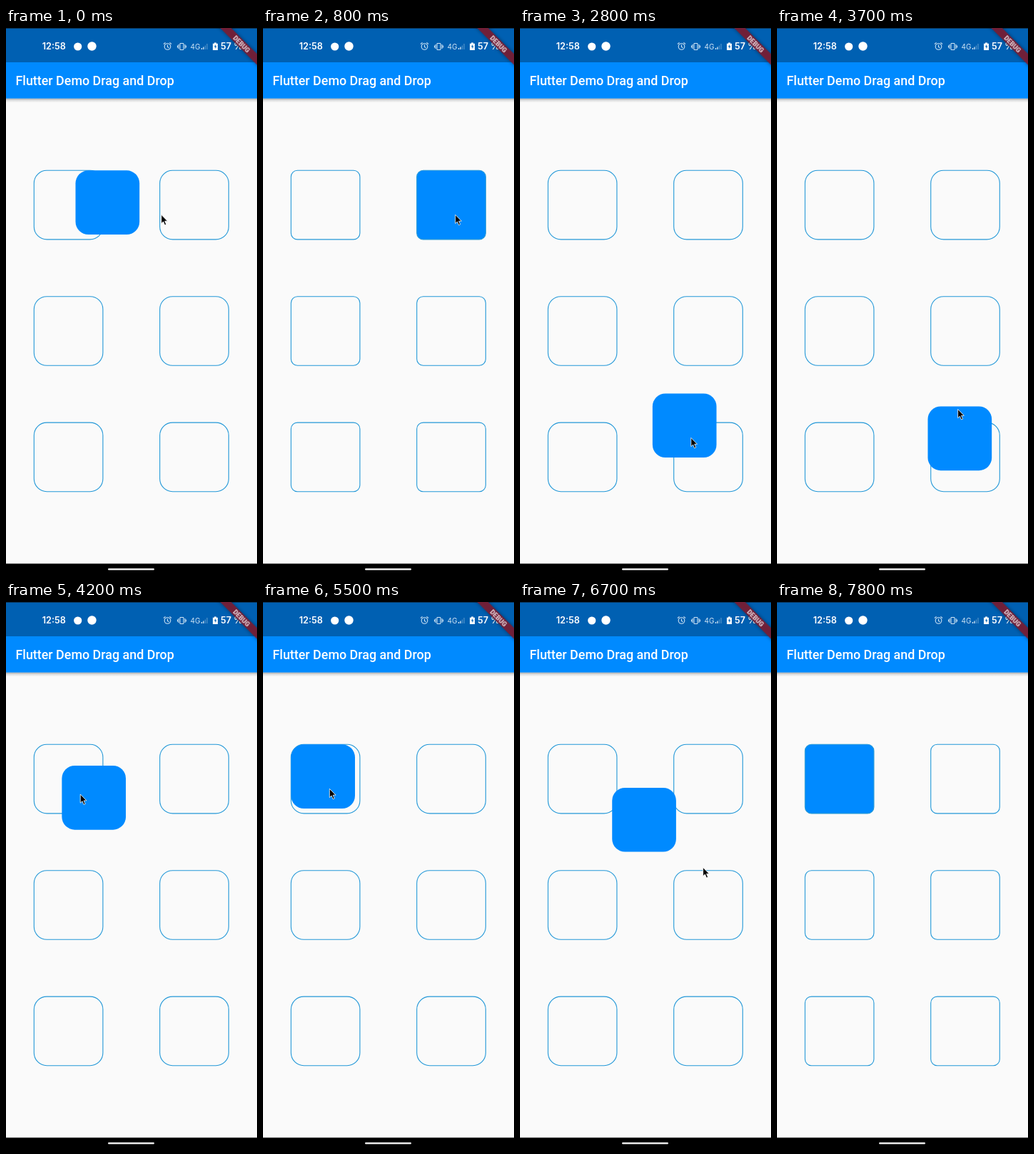
These frames come from a looping animation (352x764 px, 8.4 s). An HTML page:

```html
<!DOCTYPE html>
<html lang="en">
<head>
<meta charset="utf-8">
<title>Drag and Drop</title>
<style>
  html, body { margin: 0; width: 100%; height: 100%; overflow: hidden; background: #fafafa; }
  svg { display: block; width: 352px; height: 764px; }
  text { fill: #fff; font-family: Inter, Roboto, sans-serif; }
  .title { font: 500 17.9px Roboto, sans-serif; }
  .clock { font-size: 12.6px; font-weight: 600; }
  .line { fill: none; stroke: #cfe4f5; stroke-width: 1.1; }
  .banner { filter: drop-shadow(0 0 2.5px rgba(0, 0, 0, .5)); }
  .banner text { font: 900 9.1px Roboto, sans-serif; fill: #dcc6cd; }
</style>
</head>
<body>
<svg viewBox="0 0 352 764">
  <defs>
    <linearGradient id="shade" x2="0" y2="1">
      <stop offset="0" stop-color="#000" stop-opacity=".35"/>
      <stop offset=".4" stop-color="#000" stop-opacity=".12"/>
      <stop offset="1" stop-color="#000" stop-opacity="0"/>
    </linearGradient>
  </defs>
  <rect width="352" height="764" fill="#fafafa"/>
  <rect y="98.500" width="352" height="6" fill="url(#shade)"/>
  <rect y="48" width="352" height="50.600" fill="#008aff"/>
  <rect width="352" height="48" fill="#0060b2"/>
  <rect width="352" height="1" fill="#0a3358"/>
  <text class="title" x="13.5" y="80">Flutter Demo Drag and Drop</text>

  <text class="clock" x="50.8" y="30">12:58</text>
  <g fill="#fff">
    <circle cx="100.7" cy="26" r="5.6"/>
    <circle cx="120.5" cy="25.5" r="6.2"/>
  </g>
  <g class="line">
    <circle cx="226.5" cy="26" r="4.3"/>
    <path d="M226.5 23.5v3l2 1.2M221 22.5l2.6-2.2M232 22.5l-2.6-2.2"/>
    <rect x="244" y="21.5" width="5" height="9" rx=".8"/>
    <path d="M242 23v6M251 23v6M240.5 24.5v3M252.5 24.5v3"/>
  </g>
  <text x="258.5" y="30" font-size="10" style="fill:#cfe4f5">4G</text>
  <path d="M274.5 30v-2M277 30v-3.5" stroke="#dcecf8" stroke-width="1.3"/>
  <path d="M279.5 30v-5.5M282 30v-8" stroke="#4b8fc8" stroke-width="1.3"/>
  <path d="M292 20.5h3v1.2h2v9.3h-7v-9.3h2z" fill="#fff"/>
  <path d="M294 23l-2 3.5h1.5v2.5l2-3.5h-1.5z" fill="#0060b2"/>
  <text class="clock" x="301" y="30">57 %</text>

  <g class="banner" transform="translate(352 .8) rotate(45)">
    <rect x="-50" y="25.1" width="100" height="10.75" fill="#7d1d33" fill-opacity=".9"/>
    <text y="33.7" text-anchor="middle">DEBUG</text>
  </g>

  <g id="slots" stroke="#2398d8" stroke-width="1.1"></g>
  <rect id="block" width="89.7" height="89.7" rx="18" fill="#008aff"/>
  <rect y="749.5" width="352" height="15"/>
  <rect x="143" y="756.3" width="65" height="2.2" rx="1.1" fill="#fff"/>
  <path id="cursor" d="M0 0v12.2l2.800-2.500 2 4.800 2.100-.9-2-4.700h3.800z" stroke="#fff" stroke-width=".8"/>
</svg>
<script>
const LOOP = 8400, STEP = 100, LAG = 100, EXIT = 7700;
const GAP = 176.4, SIDE = 96.6, GRAB = [54, 62];
const $ = id => document.getElementById(id);
const block = $('block'), cursor = $('cursor');

// Held moves: start, end, from slot, to slot, sideways bulge x and y
const moves = [
  [-250, 140, 0, 1, 0, 0],
  [140, 400, 1, 1, 4, 6],
  [1020, 1720, 1, 2, -3, 63],
  [2150, 2500, 2, 5, 0, 0],
  [2500, 3000, 5, 5, -33, -45],
  [3500, 4300, 5, 0, 23, -51],
  [5500, 5800, 0, 0, -28, 0],
  [5800, 6430, 0, 0, 201, 53],
  [6430, 7120, 0, 0, 184, 124]
];

const corner = i => [39.3 + i % 2 * GAP, 199.3 + (i >> 1) * GAP];
const ease = p => p * p * (3 - 2 * p);
const moveAt = t => moves.filter(m => m[0] <= t).pop();

// Where the held block would be if it followed the hand at once
function hand(t) {
  const [start, end, from, to, ...bulge] = moveAt(t);
  const p = Math.min(1, (t - start) / (end - start));
  const a = corner(from), b = corner(to);
  return a.map((v, i) => v + (b[i] - v) * ease(p) + bulge[i] * Math.sin(Math.PI * p) ** 2);
}

const slots = Array.from({ length: 6 }, (_, i) => {
  const r = document.createElementNS('http://www.w3.org/2000/svg', 'rect');
  const [x, y] = corner(i);
  const box = { x, y, width: SIDE, height: SIDE };
  for (const k in box) r.setAttribute(k, box[k]);
  return $('slots').appendChild(r);
});

const place = (el, [x, y]) => el.setAttribute('transform', `translate(${x} ${y})`);
const show = (el, on) => el.setAttribute('visibility', on ? 'visible' : 'hidden');

function draw(now) {
  const t = Math.floor(now % LOOP / STEP) * STEP;
  const [, end, , slot] = moveAt(t);
  const held = t < end + LAG;
  slots.forEach((r, i) => {
    r.setAttribute('rx', held ? 18 : 9);
    r.setAttribute('fill', !held && i === slot ? '#008aff' : 'none');
  });
  place(block, hand(t - LAG));
  show(block, held);
  place(cursor, hand(t).map((v, i) => v + GRAB[i]));
  show(cursor, t < EXIT);
}

const begin = performance.now();
function tick() {
  draw(performance.now() - begin);
  requestAnimationFrame(tick);
}
tick();
</script>
</body>
</html>
```
